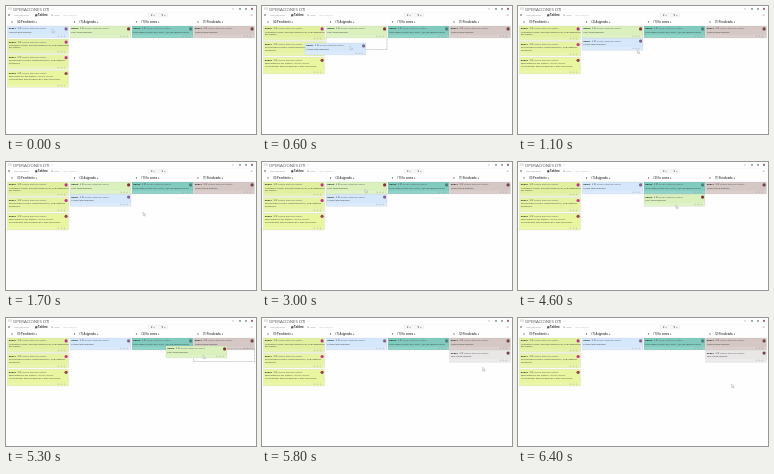
An HTML page for the animation above (6500 ms loop, 250 px wide and 128 px high).

```html
<!DOCTYPE html>
<html lang="es">
<head>
<meta charset="utf-8">
<title>Tablero</title>
<style>
html, body { margin: 0; width: 100%; height: 100%; overflow: hidden; background: #fff; }
svg { display: block; width: 100vw; height: 100vh; font-family: "Open Sans", Roboto, sans-serif; }
</style>
</head>
<body>
<svg id="stage" viewBox="0 0 250 128" preserveAspectRatio="none"></svg>
<script>
const LOOP = 6500, STEP = 100;
const COLUMNS = [1.5, 64, 126, 187.5];
const TOP = 20, SECOND = 32.2, GAP = 1.4;
const stage = document.getElementById('stage');

function add(parent, tag, attrs, text) {
  const node = document.createElementNS('http://www.w3.org/2000/svg', tag);
  for (const key in attrs) node.setAttribute(key, attrs[key]);
  if (text) node.textContent = text;
  parent.appendChild(node);
  return node;
}
const rect = (p, x, y, width, height, fill, more) =>
  add(p, 'rect', { x, y, width, height, fill, ...more });
const label = (p, x, y, size, text, fill = '#555', more) =>
  add(p, 'text', { x, y, 'font-size': size, fill, ...more }, text);
const dot = (p, cx, cy, r, fill) => add(p, 'circle', { cx, cy, r, fill });
const moveTo = (node, x, y) => node.setAttribute('transform', `translate(${x} ${y})`);
const show = (node, opacity) => node.setAttribute('opacity', opacity);

// Header and toolbar
rect(stage, 0, 0, 250, 128, '#fefefe');
label(stage, 1.5, 4.4, 4, '88', '#bbb');
label(stage, 7, 4.5, 4.3, 'OPERACIONES DTI', '#555');
label(stage, 45, 4.2, 3, '☆', '#aaa');
dot(stage, 227, 2.9, .7, '#aaa');
dot(stage, 234, 2.9, .8, '#666');
dot(stage, 240, 2.9, .9, '#7a6f96');
dot(stage, 246, 2.9, 1.1, '#a5606c');
rect(stage, 0, 6, 250, .25, '#eee');
dot(stage, 3, 9, .9, '#888');
label(stage, 8, 10, 2.5, 'Vista general', '#888');
label(stage, 29, 10, 2.6, '▦ Tablero', '#333', { 'font-weight': 700 });
label(stage, 45, 10, 2.5, '☰ Lista', '#888');
label(stage, 57, 10, 2.5, 'Vista rápida', '#bbb');
for (const x of [142, 152.5]) {
  rect(stage, x, 7.2, 9, 3.8, '#f8f8f8', { stroke: '#e2e2e2', 'stroke-width': .3 });
  label(stage, x + 2.5, 10, 2.5, '▼ 0', '#333');
}
label(stage, 244.5, 10, 2.6, '☰', '#999');

const headings = ['Pendiente', 'Asignado', 'En curso', 'Finalizado'].map((name, i) => {
  const x = COLUMNS[i];
  dot(stage, x + 4.5, 15.9, .7, '#555');
  return { name, node: label(stage, x + 9.5, 17, 2.8, name, '#333', { 'font-weight': 600 }) };
});

function card(color, height, id, lines, avatar) {
  const g = add(stage, 'g');
  rect(g, 0, 0, 61, height, color, { stroke: '#0002', 'stroke-width': .35 });
  rect(g, 0, height - 3.2, 61, 3.2, '#fff', { opacity: .15 });
  label(g, 1.3, 3.4, 2.4, '#' + id, '#222', { 'font-weight': 700 });
  label(g, 10, 3.4, 2.4, '▾  ⚙  Grupo atención datos', '#556');
  lines.forEach((line, i) => label(g, 1.3, 6.6 + i * 2.6, 2.35, line, '#333'));
  dot(g, 58.6, 2.9, 1.6, avatar);
  for (let i = 0; i < 3; i++)
    add(g, 'circle', { cx: 51 + i * 3, cy: height - 1.7, r: .65, fill: 'none', stroke: '#999', 'stroke-width': .25 });
  return g;
}

const HEIGHTS = [14.2, 14.4, 16.6];
const waiting = [
  card('#e0f09f', HEIGHTS[0], '8540', ['HACEMOS CARGA MANTENIMIENTO ET, PARAMETRIZAR', 'DE TAREAS'], '#b53a86'),
  card('#e6f3a3', HEIGHTS[1], '8541', ['MONITOREO CARGA ADMINISTRATIVA, PARAMETRIZ', 'MODELOS'], '#c0388c'),
  card('#e9f59f', HEIGHTS[2], '8548', ['SEGUIMIENTO DE TAREAS Y PLAN ANUAL', 'ACTIVIDADES DISPONIBLES EN LÍNEA DE DATOS'], '#8a4a50')
];
const teal = card('#80cabe', 12, '8843', ['DOCUMENTACIÓN EN LÍNEA, AJUSTE SERVICIOS DTI'], '#4c7f7c');
const mauve = card('#d5c7c4', 12, '8841', ['Nueva tarea ejemplo'], '#74404b');
const placed = card('#e9e6e6', 12, '8850', ['Test: tarea ejemplo'], '#74404b');
const slot = rect(stage, 0, SECOND - 1.5, 61, 12.8, 'none',
  { stroke: '#777', 'stroke-width': .4, 'stroke-dasharray': '1 .5' });
const green = card('#daf0bd', 12, '8850', ['Test: tarea ejemplo'], '#7b3440');
const blue = card('#d5e7fb', 12, '8857', ['Nueva tarea ejemplo'], '#80648f');
const pointer = add(stage, 'path', {
  d: 'M0 0V3.5L.9 2.7L1.6 4.2L2.2 3.9L1.6 2.5H2.7Z',
  fill: '#fff', stroke: '#777', 'stroke-width': .3
});

// Each row is [time, x, y].
const bluePath = [[0, 1.5, TOP], [150, 1.5, TOP], [600, 43, 37], [700, 64, SECOND]];
const greenPath = [[0, 64, TOP], [3100, 64, TOP], [3600, 111, 35], [3700, 126, SECOND],
  [4800, 126, SECOND], [5300, 160, 28], [5600, 187.5, SECOND]];
const pointerPath = [[0, 46, 23], [150, 46, 23], [600, 88, 40], [800, 106, 39],
  [1500, 137, 50], [2200, 137, 50], [2900, 103, 27], [3100, 103, 27],
  [3600, 150, 42], [4300, 150, 44], [4800, 163, 42], [5300, 197, 37],
  [5600, 224, 41], [6200, 213.5, 66], [6500, 213.5, 66]];

function at(path, t) {
  const next = path.findIndex(step => step[0] > t);
  if (next < 0) return path[path.length - 1].slice(1);
  const a = path[next - 1], b = path[next];
  const k = (t - a[0]) / (b[0] - a[0]);
  return [a[1] + (b[1] - a[1]) * k, a[2] + (b[2] - a[2]) * k];
}

function draw(t) {
  const blueDrag = t > 150 && t < 700;
  const greenDrag = t > 3100 && t < 3700;
  const finalDrag = t > 4800 && t < 5600;
  const done = t >= 5700;

  let y = t < 400 ? SECOND + 1 : TOP;
  waiting.forEach((node, i) => {
    moveTo(node, COLUMNS[0], y);
    y += HEIGHTS[i] + GAP;
  });
  moveTo(teal, COLUMNS[2], TOP);
  moveTo(mauve, COLUMNS[3], TOP);
  moveTo(placed, COLUMNS[3], SECOND);
  show(placed, done ? 1 : 0);
  moveTo(green, ...at(greenPath, t));
  show(green, done ? 0 : t >= 3700 && t < 3900 ? .35 : 1);
  moveTo(blue, ...(t >= 3400 ? [COLUMNS[1], TOP] : at(bluePath, t)));

  const target = blueDrag ? 1 : greenDrag ? 2 : 3;
  slot.setAttribute('x', COLUMNS[target]);
  show(slot, blueDrag && t >= 400 || greenDrag && t >= 3400 || finalDrag && t >= 5100 ? 1 : 0);
  moveTo(pointer, ...at(pointerPath, t));

  const counts = [t < 700 ? 4 : 3, t < 700 ? 1 : t < 3700 ? 2 : 1,
    t >= 3700 && t < 5600 ? 2 : 1, t < 5600 ? 1 : 2];
  headings.forEach(({ name, node }, i) => node.textContent = `(${counts[i]}) ${name}  +`);
}

const start = performance.now();
function tick() {
  const t = (performance.now() - start) % LOOP;
  draw(Math.floor(t / STEP) * STEP);
  requestAnimationFrame(tick);
}
tick();
</script>
</body>
</html>
```
